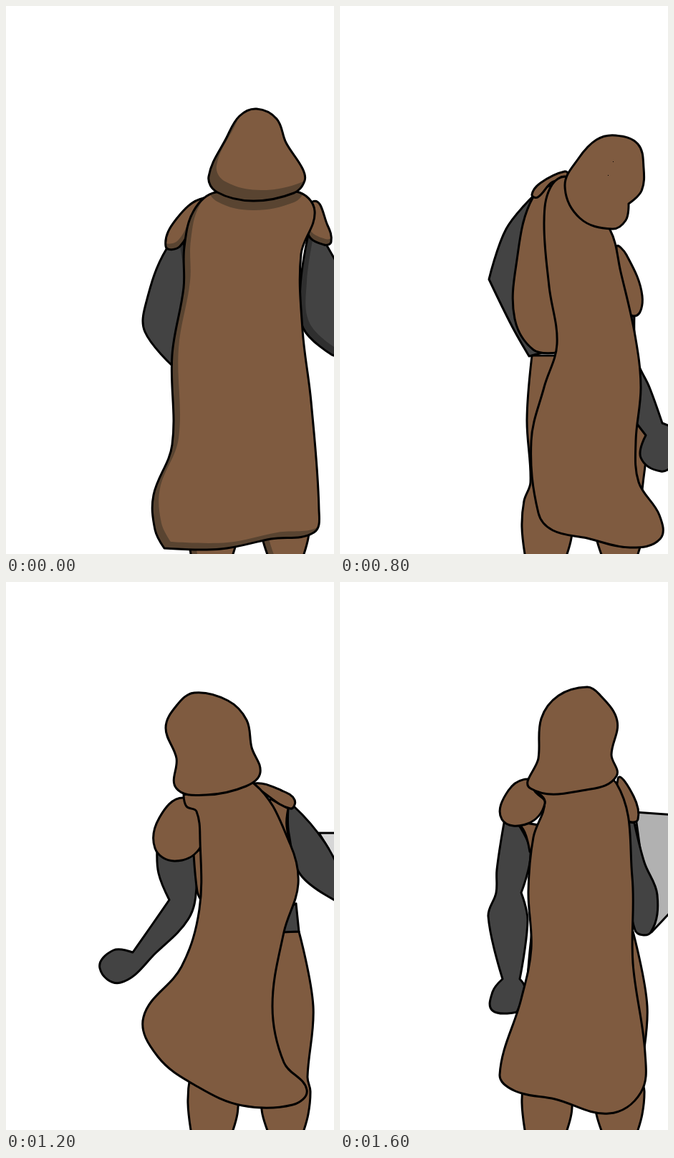
An HTML page that plays this animation: 458 px wide and 762 px high, repeating every 1700 ms.

```html
<!DOCTYPE html>
<html lang="en">
<head>
<meta charset="utf-8">
<title>Hooded figure</title>
<style>
  html, body { margin: 0; width: 100%; height: 100%; overflow: hidden; background: #fff; }
  svg { display: block; width: 100%; height: 100%; }
  .line { stroke: #000; stroke-width: 3; stroke-linejoin: round; }
</style>
</head>
<body>
<svg id="stage" viewBox="0 0 458 762"></svg>
<script>
const stage = document.getElementById('stage');
const STEP = 100, STEPS = 17;
const BROWN = '#7f5b40', GREY = '#434343', STEEL = '#b1b1b1';
const DARK = { [BROWN]: '#594431', [GREY]: '#2f2f2f' };
const FILL = { blade: STEEL, belt: GREY, armL: GREY, armR: GREY };
const LAYERS = ['blade', 'body', 'belt', 'armL', 'armR', 'torso', 'padL', 'padR', 'cape', 'hood'];

// How far the lit area of each part is pushed away from its shaded edge.
const LIGHT = { hood: [11, -15], cape: [9, -9], padL: [-3, -8], padR: [2, -8], armL: [-5, 6], armR: [9, -7], body: [9, 0] };

// Key points of smooth closed outlines; "!" marks a sharp corner.
const LEGS = '257,688 254,725 259,768! 315,768! 323,740 326,705 340,650! 355,712 358,740 367,768! 414,768! 422,740 425,708 421,688';
const BODY = `268,486! 261,575 266,662 ${LEGS} 429,590 409,486!`;

const poses = [
  {
    at: 0, hold: 500, shaded: true, body: LEGS,
    hood: '350,143 378,157 391,190 414,226 417,243 402,260 345,271 295,259 283,237 308,183 326,153',
    cape: '293,259 262,285 249,335 248,392 232,485 232,610 206,680 208,728 221,754! 300,755 370,741 430,732 437,700 426,550 414,450 412,345 431,285 405,258',
    padL: '276,267 238,296 223,334 243,334 265,290',
    padR: '428,272 449,305 454,328 444,332 422,317',
    armL: '224,338 195,415 194,453 232,500! 260,400! 248,328!',
    armR: '422,318! 448,333! 475,380! 475,492! 455,485! 415,448 411,390'
  },
  {
    at: 500, hold: 100, body: LEGS,
    hood: '376,178 400,188 415,232 400,268 402,292 370,313 330,288 297,252 317,228 342,191',
    cape: '290,244 267,260 263,310 264,380 259,520 243,597 206,690 224,731 290,723 330,731 420,756 448,735 441,640 430,560 396,430 390,400 398,355 417,315 402,296 350,280',
    padL: '268,258 232,286 235,309 258,308 275,280',
    padR: '403,296 418,299 445,338 441,376 418,373 395,350',
    torso: '250,311! 259,335 264,360! 290,360! 290,290!',
    armL: '229,303 193,385 191,433 258,513! 272,500! 259,463 236,423! 264,362 250,305',
    armR: '397,352! 441,376! 447,405 448,450! 475,480! 475,590! 425,512 397,430 390,390!'
  },
  {
    at: 800, hold: 200, dots: [[381, 216], [374, 235]],
    hood: '385,180 416,192 424,225 421,257 403,275! 399,298 380,310 335,295 314,250 333,212 358,186',
    cape: '318,238 294,252 285,300 292,390 303,470 285,530 267,605 277,705 297,729 345,740 405,753 447,741 446,708 417,662 413,605 420,530 412,458 392,370 377,311 340,270',
    padL: '314,230 280,246 268,262 276,266 296,245 319,238',
    padR: '386,335 400,346 422,403 410,431 395,400',
    torso: '270,265 246,360 244,435 270,478 303,482! 315,400! 310,245!',
    armL: '270,264! 232,310 208,380! 240,445 264,487! 290,480! 290,300!',
    armR: '402,432! 411,431! 414,490 432,530 450,580! 465,586! 465,635 448,647 420,628 427,597! 410,575! 400,500!'
  },
  {
    at: 1000, hold: 100, over: ['armR', 'padR'],
    hood: '397,195 428,205 441,243 430,274 400,321 355,317 324,280 332,248 352,210',
    cape: '324,271 302,293 283,400 247,490 247,600 233,660 253,711 322,738 390,761 434,742 430,685 408,640 397,555 368,445 364,388 388,341 402,332 402,322 350,300',
    padL: '314,273 283,287 266,313 285,297 315,285',
    padR: '404,332 424,370 407,403 375,398 370,362',
    torso: '272,314! 281,350 286,383! 305,330! 303,291! 285,298',
    armL: '266,314 229,375 232,410 257,456! 273,425 260,388! 281,355 273,313',
    armR: '369,390! 392,405 415,393 426,440 421,475! 455,515 468,540! 468,622! 447,615 454,588! 430,562 390,514 368,430'
  },
  {
    at: 1200, hold: 100, steel: '#d6d6d6',
    hood: '263,154 310,165 336,192 343,230 355,265 335,284 280,296 238,287 238,245 223,203 238,172',
    cape: '248,296! 252,312 266,319 271,360 270,455 245,535 192,605 212,660 268,702 330,728 400,727 420,706 388,668 372,590 388,487 408,420 397,365 347,281 300,285',
    padL: '248,300 214,328 208,370 235,388 270,371 275,330',
    padR: '347,280 385,290 403,303 397,315 360,293',
    torso: '262,378! 267,430 272,442! 340,430! 407,408! 392,340 394,315! 370,302!',
    belt: '390,455! 405,447! 409,486! 386,487!',
    armL: '211,370! 213,405 228,442! 203,478 177,515! 150,512 131,537 160,557 210,515 255,468 266,425 263,370!',
    armR: '394,315! 402,312 445,362 475,420! 470,448! 412,408 395,350',
    blade: '437,349! 470,349! 470,420! 450,370!'
  },
  {
    at: 1400, hold: 100,
    hood: '288,140 328,155 349,195 352,222 366,245 325,278 280,287 249,268 249,238 234,203 247,158',
    cape: '264,286! 265,298 293,302 306,335 293,420 278,510 260,575 203,633 235,673 280,678 345,710 410,736 447,710 447,610 425,555 384,510 358,445 365,385 380,310 352,264 305,275',
    padL: '264,287 230,310 236,352 262,371 305,347 305,300',
    padR: '355,262 384,284 384,296 370,282',
    torso: '290,362! 293,390 290,420! 330,450! 359,461! 403,457 387,433 378,385 381,300! 340,290!',
    belt: '360,461! 405,455! 408,486! 372,488!',
    armL: '236,358 224,400 231,455 252,481! 229,505 193,554! 185,540 160,540 154,580 175,588 225,560 278,510! 293,400 288,360!',
    armR: '380,343 402,390 400,418 385,427 372,370',
    blade: '108,387! 240,378! 240,424! 68,432 64,427!'
  },
  {
    at: 1600, hold: 100, over: ['padL'],
    hood: '345,146 362,156 387,193 379,240 386,270 350,288 266,287 277,245 281,190 305,158',
    cape: '270,290! 286,305 270,355 263,430 267,510 253,580 223,685 245,708 300,719 375,739 420,710 426,655 409,530 408,410 386,280 330,280',
    padL: '264,274 235,290 226,330 262,336 286,308 272,291',
    padR: '388,274 410,298 416,330 402,331',
    torso: '247,333! 258,348 265,375! 290,340!',
    armL: '229,335! 219,400 218,432 207,465 227,552! 213,570 213,596 247,598! 258,565 251,552! 262,470 253,432! 266,375 247,334!',
    armR: '402,333! 411,335! 425,390 443,435 434,487 412,484 404,400',
    blade: '412,320! 470,324! 470,450! 435,487!'
  }
].map(pose => ({ body: BODY, over: [], dots: [], ...pose }));

// Tangents follow the neighbouring points, handles scale with the segment.
function curve(text) {
  const pts = text.split(' ').map(s => {
    const [x, y] = s.replace('!', '').split(',').map(Number);
    return { x, y, sharp: s.endsWith('!') };
  });
  const at = i => pts[(i + pts.length) % pts.length];
  const distance = (a, b) => Math.hypot(b.x - a.x, b.y - a.y);
  const handle = (i, sign) => {
    const p = at(i), a = at(i - 1), b = at(i + 1);
    const k = p.sharp ? 0 : sign * 0.36 * distance(p, at(i + sign)) / distance(a, b);
    return `${p.x + (b.x - a.x) * k} ${p.y + (b.y - a.y) * k}`;
  };
  return `M${pts[0].x} ${pts[0].y}` + pts.map((_, i) =>
    `C${handle(i, 1)} ${handle(i + 1, -1)} ${at(i + 1).x} ${at(i + 1).y}`).join('') + 'Z';
}

function sample(d, count = 90) {
  const path = document.createElementNS('http://www.w3.org/2000/svg', 'path');
  path.setAttribute('d', d);
  const length = path.getTotalLength();
  return Array.from({ length: count }, (_, i) => path.getPointAtLength(length * i / count));
}

function blend(a, b, t) {
  const end = sample(b);
  return 'M' + sample(a).map((p, i) =>
    `${p.x + (end[i].x - p.x) * t} ${p.y + (end[i].y - p.y) * t}`).join('L') + 'Z';
}

function shadedPart(name, d, fill, hood) {
  const cast = name === 'cape' ? `<path d="${hood}" transform="translate(0 13)" fill="${DARK[fill]}"/>` : '';
  return `<clipPath id="clip-${name}"><path d="${d}"/></clipPath>
    <g clip-path="url(#clip-${name})"><path d="${d}" fill="${DARK[fill]}"/>
    <path d="${d}" transform="translate(${LIGHT[name]})" fill="${fill}"/>${cast}</g>
    <path class="line" d="${d}" fill="none"/>`;
}

function picture(time) {
  const index = poses.findLastIndex(p => p.at <= time);
  const from = poses[index], to = poses[index + 1] || from;
  const start = from.at + from.hold - STEP;
  const t = time > start ? (time - start) / (to.at - start) : 0;
  const order = [...LAYERS.filter(n => n !== 'hood' && !from.over.includes(n)), ...from.over, 'hood'];
  const shapes = order.filter(n => from[n] && (!t || to[n])).map(n => {
    const d = t && n !== 'body' ? blend(curve(from[n]), curve(to[n]), t) : curve(from[n]);
    const fill = n === 'blade' && !t && from.steel || FILL[n] || BROWN;
    return from.shaded ? shadedPart(n, d, fill, curve(from.hood)) : `<path class="line" d="${d}" fill="${fill}"/>`;
  });
  const dots = t ? [] : from.dots.map(([x, y]) => `<rect x="${x}" y="${y}" width="1" height="1"/>`);
  return [...shapes, ...dots].join('');
}

const pictures = Array.from({ length: STEPS }, (_, i) => picture(i * STEP));
const begin = performance.now();
let shown = -1;

function draw() {
  const step = Math.floor(Math.max(0, performance.now() - begin) / STEP) % STEPS;
  if (step !== shown) stage.innerHTML = pictures[shown = step];
  requestAnimationFrame(draw);
}
draw();
</script>
</body>
</html>
```
